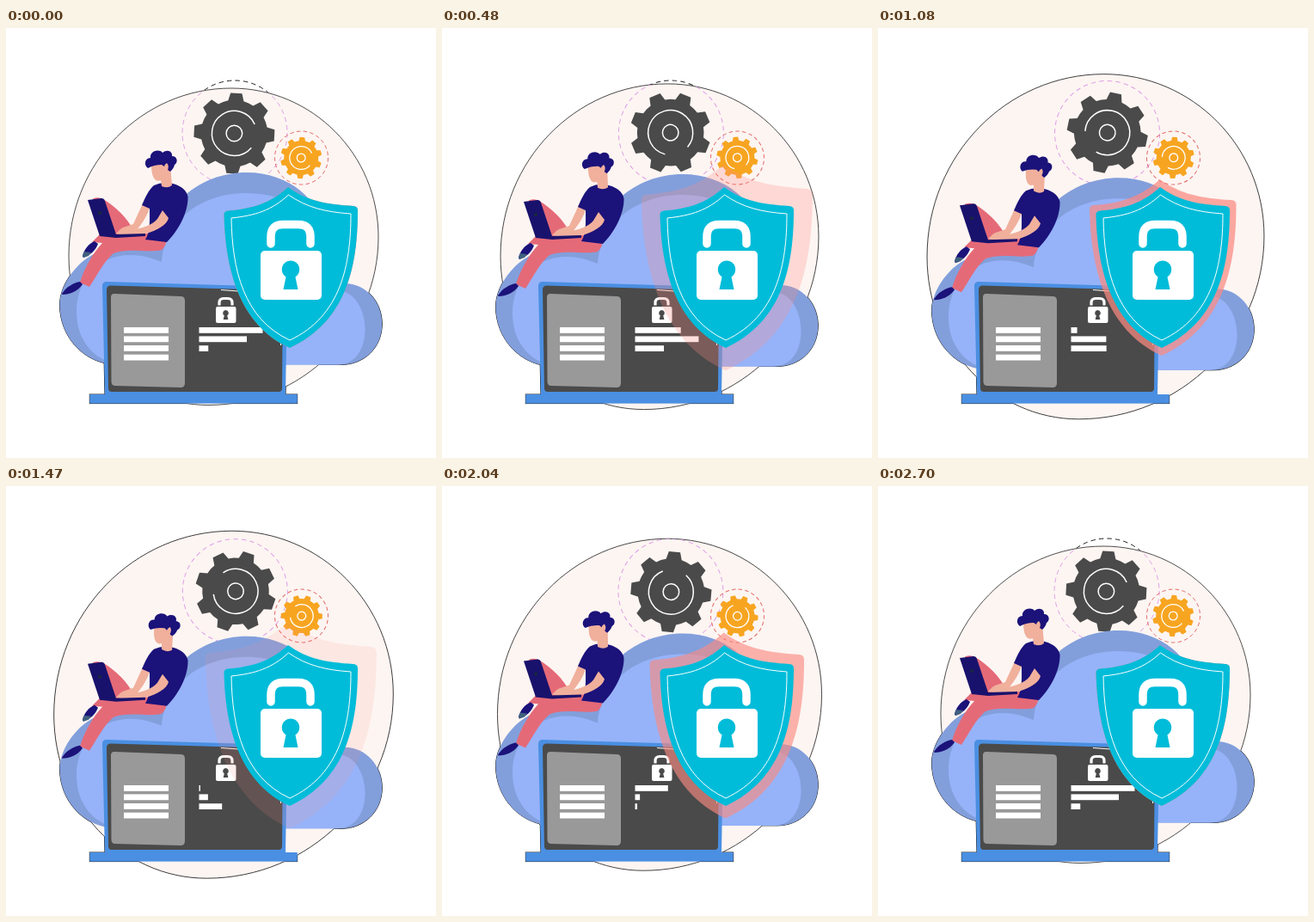
Write an HTML page that moves like this. It is 500x500 px and loops after 2730 ms.

```html
<!DOCTYPE html>
<html lang="en">
<head>
<meta charset="utf-8">
<title>Cloud security</title>
<style>
html, body { margin: 0; width: 100%; height: 100%; overflow: hidden; background: #fff; }
svg { display: block; width: 100%; height: 100%; }
.edge { fill: #222; stroke: #222; stroke-width: 1; }
.line { fill: none; stroke: #fff; stroke-width: 1.5; }
.bold { stroke-width: 2.5; }
.fine { stroke-width: 1; }
.navy { fill: #1b127a; }
.skin { fill: #f0b09c; }
.pants { fill: #e56a78; }
.cyan { fill: #00bcd9; }
.frame { fill: #4a8fe2; }
.white { fill: #fff; }
.ring { fill: none; stroke-width: 1; }
</style>
</head>
<body>
<svg viewBox="0 0 500 500">
  <defs>
    <path id="cloud" d="M62.500 322C62.500 300 80 275 100 264C122 252 150 255 176 252C182 210 222 168 280 168C330 168 365 200 372 240C378 270 385 295 392 297C418 296 437.300 318 437.300 344C437.300 372 416 391.500 390 391.500H130C92 391.500 62.500 360 62.500 322Z"/>
    <path id="blob" d="M73 265C73 157 158 70 262 70C356 70 433 147 433 243C433 351 344 438.500 235 438.500C145 438.500 73 361 73 265Z"/>
    <path id="shield" d="M328 185C350 201 372 205 404 207Q409 207.500 409 212C409 275 397 341 330 372C271 345 255 280 253.500 217Q253.500 213 258 212.500C287 210 307 204 328 185Z"/>
    <path id="screen" d="M112 300Q112 295 117 295L321 301Q327 301.500 327 307L325 427H115Z"/>
    <rect id="base" x="97.300" y="426" width="241.400" height="10.600"/>
    <clipPath id="inside"><use href="#blob" class="breathe"/></clipPath>
  </defs>

  <g class="edge">
    <use href="#cloud" class="bob"/>
    <use href="#screen"/>
    <use href="#base"/>
  </g>
  <g class="ring" stroke="#222" stroke-dasharray="5.500 4.080">
    <circle class="spin" cx="266" cy="122" r="61"/>
  </g>
  <use href="#blob" class="breathe" fill="#fdf5f2" stroke="#222" stroke-width=".8"/>
  <g clip-path="url(#inside)">
    <g class="ring" stroke="#de9ee6" stroke-dasharray="5.500 4.080">
      <circle class="spin" cx="266" cy="122" r="61"/>
    </g>
  </g>
  <g class="ring" stroke="#e26a66" stroke-dasharray="4.500 3.290">
    <circle class="spin" data-at="343.500,151" cx="343.500" cy="151" r="31"/>
  </g>
  <g class="spin">
    <g transform="translate(265.400 122.500)">
      <path id="bigGear" fill="#4a4a4a"/>
      <path class="line" d="M23.800 -10.500A26 26 0 1 0 19.900 16.700"/>
      <circle class="line" r="9.300"/>
    </g>
  </g>
  <g class="spin" data-at="343.500,151">
    <g transform="translate(343.200 151)">
      <path id="smallGear" fill="#f7a521"/>
      <g transform="scale(.515)">
        <path class="line bold" d="M23.800 -10.500A26 26 0 1 0 19.900 16.700"/>
        <circle class="line bold" r="9.500"/>
      </g>
    </g>
  </g>

  <g class="bob">
    <use href="#cloud" fill="#829fdc"/>
    <path fill="#96b3f9" d="M82 330C82 295 105 264 145 264C160 264 170 268 181 272C185 225 225 192 280 192C315 192 345 205 360 240L385 306C405 304 417.500 328 417.500 350C417.500 375 405 391.500 385 391.500H140C105 391.500 82 365 82 330Z"/>

    <path class="pants" d="M101 198.500Q107 196 113 199C128 208 141 221 149 236L128 244L113 250L100 249L109 240Z"/>
    <path class="navy" d="M89 265C91 257 96 251 103 248L107 251C104 259 98 264 90 267Z"/>
    <path fill="#3f607f" d="M89 265L91 260L99 261L96 265L90 267Z"/>
    <path class="pants" d="M187 243L160 238C138 240 120 241 112 250C101 262 91 279 86 296L97 301C106 288 113 272 125 262C142 255 166 262 181 258Q187 253 187 243Z"/>
    <path class="navy" d="M65 309C70 301 79 296 86 295L89 298C84 306 74 310 65.500 310Z"/>

    <path class="skin" d="M159 204L167 209C164 219 158 228 151 236L133 239Q128 236 136 232L148 228Z"/>
    <path class="navy" d="M172 183Q182 178 194 181Q209 185 211.500 196C212 215 200 236 187 249L162 246C168 237 167 222 167 210L158 206C162 197 166 188 172 183Z"/>
    <path class="skin" d="M182 212L189 221C187 229 176 235 163 239Q145 243 128 239Q131 234 141 234C156 235 170 229 176 222Z"/>
    <path fill="#19126c" d="M95 200L111 198Q114 198 115 201L128 240L162 239V242L128 244L109 242Z"/>
    <circle cx="109" cy="215" r="2" fill="#17283e"/>

    <g id="head">
      <path class="skin" d="M169 160Q169 171 173 176Q176 179 180 177L181 184Q188 187 193 183L191 159L180 153Z"/>
      <path class="navy" d="M165 163C160 160 161 151 168 151C167 143 178 140 182 145C188 140 194 144 193 149C200 149 200 157 196 159C195 163 193 165 191 167L188 165Q190 160 187 157Q184 159 184 161L181 159Q172 159 165 163Z"/>
    </g>
  </g>

  <use href="#screen" class="frame"/>
  <path fill="#4a4a4a" d="M117 304Q117 299.500 122 299.500L316 305Q322 305 322 311L321 419Q321 423 317 423H123Q119 423 119 419Z"/>
  <path fill="#999" d="M122 313Q122 309 126 309L203 312Q208 312 208 317V413Q208 418 203 418L127 416Q122.500 416 122.500 411Z"/>
  <use href="#base" class="frame"/>
  <g id="text" class="white"></g>
  <path class="line fine" d="M250 304.500L270 306M319.500 363V369"/>
  <rect class="white" x="244" y="324" width="23.500" height="19" rx="2"/>
  <path class="line" style="stroke-width:3.200" d="M248 322.500V319.500Q248 314.500 253 314.500H258Q263 314.500 263 319.500V322.500"/>
  <path fill="#4a4a4a" d="M255.500 328A3.400 3.400 0 0 1 257.200 334.300L258.400 339H252.700L253.800 334.300A3.400 3.400 0 0 1 255.500 328Z"/>

  <use id="pulse" href="#shield" fill="#fb8b82"/>
  <use href="#shield" class="cyan"/>
  <path class="line fine" d="M328.500 194C350 209 372 214 401 216C401 274 390 335 330 363C276 338 263 281 262 221C290 218 309 212 328.500 194Z"/>
  <rect class="white" x="296" y="259" width="71" height="57" rx="5"/>
  <path class="line" style="stroke-width:9.500;stroke-linecap:round" d="M308 251V243Q308 228.500 322 228.500H340Q354 228.500 354 243V251"/>
  <path class="cyan" d="M331 270.500A10.300 10.300 0 0 1 336.500 289.500L339.500 304H322.500L325.500 289.500A10.300 10.300 0 0 1 331 270.500Z"/>
</svg>
<script>
const LOOP = 2730, STEP = 30, TURN = 2700, PULSE = 900;
const all = s => [...document.querySelectorAll(s)];
const byId = id => document.getElementById(id);
const head = byId('head'), pulse = byId('pulse'), text = byId('text');
const wave = x => (1 - Math.cos(2 * Math.PI * x)) / 2;

// tip and foot are half the tooth width, as a share of the pitch
function gearPath(teeth, outer, root, tip, foot) {
  const pitch = 360 / teeth, pts = [];
  for (let i = 0; i < teeth; i++) {
    for (const [r, off] of [[root, -foot], [outer, -tip], [outer, tip], [root, foot], [root, 0.5]]) {
      const a = (3 + (i + off) * pitch) * Math.PI / 180;
      pts.push((r * Math.sin(a)).toFixed(2) + ' ' + (-r * Math.cos(a)).toFixed(2));
    }
  }
  return 'M' + pts.join('L') + 'Z';
}

function bar(x, y, w) {
  const r = document.createElementNS('http://www.w3.org/2000/svg', 'rect');
  for (const [k, v] of Object.entries({ x, y, width: w, height: 6.8 })) r.setAttribute(k, v);
  text.append(r);
  return r;
}

byId('bigGear').setAttribute('d', gearPath(8, 47.2, 38.8, 0.18, 0.3));
byId('smallGear').setAttribute('d', gearPath(10, 24.2, 20, 0.18, 0.3));
[348, 358.4, 369, 379.7].forEach(y => bar(137, y, 52));

// full width and time of full width for each typed line
const lines = [[74, 0], [74, 450], [43, 900]].map(([w, peak], i) =>
  ({ w, peak, el: bar(224.5, [348, 358.4, 369.2][i], w) }));

const bobbing = all('.bob'), breathing = all('.breathe');
const spinning = all('.spin').map(el => ({ el, at: el.dataset.at || '266.2,122.3' }));

function draw(t) {
  const e = wave(t / TURN);
  const scale = 1 + 0.098 * e;
  for (const el of bobbing) el.setAttribute('transform', `translate(0 ${7 * e})`);
  for (const el of breathing)
    el.setAttribute('transform', `translate(253 254.7) scale(${scale}) translate(-253 -254.7)`);
  for (const { el, at } of spinning)
    el.setAttribute('transform', `rotate(${360 * t / TURN},${at})`);
  head.setAttribute('transform', `rotate(${8 * e},187,184)`);
  for (const { el, w, peak } of lines)
    el.setAttribute('width', w * (1 - wave((t - peak) / TURN)));

  const p = t % PULSE;
  const grow = 1 + 0.28 * wave(Math.min(p / 450, 1) / 2);
  pulse.setAttribute('transform', `translate(331 278.5) scale(${grow}) translate(-331 -278.5)`);
  pulse.setAttribute('opacity', Math.max(0, 1 - p / 660));
}

const start = performance.now();
function tick() {
  const t = (performance.now() - start) % LOOP;
  draw(Math.floor(t / STEP) * STEP);
  requestAnimationFrame(tick);
}
draw(0);
requestAnimationFrame(tick);
</script>
</body>
</html>
```
